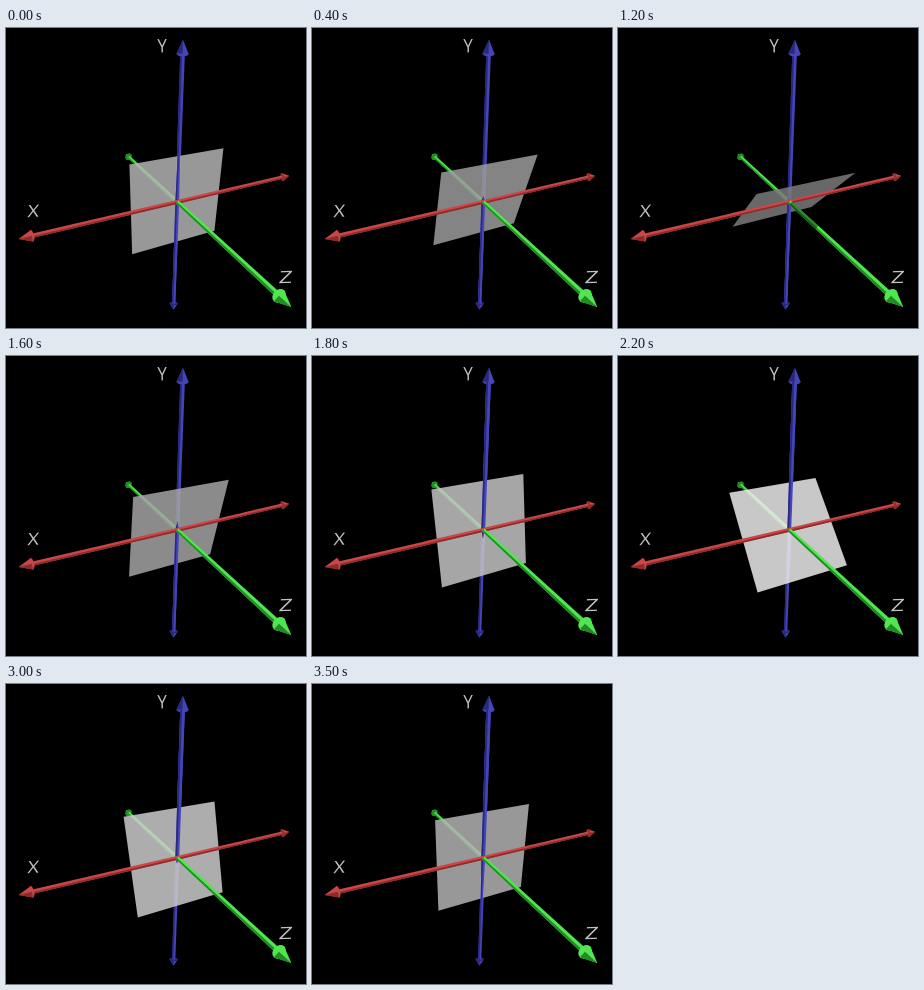
Write an HTML page that moves like this. It is 300 by 300 pixels and loops after 3.6 s.

```html
<!DOCTYPE html>
<html lang="en">
<head>
<meta charset="utf-8">
<title>Plane turning about the X axis</title>
<style>
  html, body { margin: 0; width: 100%; height: 100%; overflow: hidden; background: #000; }
  svg { display: block; width: 100vw; height: 100vh; }
  text { font-family: "Open Sans", "DejaVu Sans", sans-serif; font-size: 17px; fill: #c4c4c4; text-anchor: middle; }
</style>
</head>
<body>
<svg viewBox="0 0 300 300">
  <rect width="300" height="300"/>
  <g id="behind"></g>
  <polygon id="plane" fill-opacity=".84"/>
  <g id="yFront"></g>
  <g id="front"></g>
  <g id="labels">
    <text transform="matrix(1.15 -.06 -.08 1 27 189)">X</text>
    <text transform="matrix(1 -.02 .02 1.1 156.3 24.5)">Y</text>
    <text transform="matrix(1.4 -.04 -.12 1 279 255)">Z</text>
  </g>
</svg>
<script>
const FRAME = 100, FRAMES = 36, SEGMENT = 12;
const ORIGIN = [171.3, 173.8];
const HALF = 1 / 3, RADIUS = 1.9, CONE = 4.9, NECK = 0.93;

// Screen direction, perspective factor, and side of the shaded edge
const axes = {
  x: { dir: [-131.2, 30.7], k: 0.1734, shade: -1, tilt: 0.4, light: '#cb4646', dark: '#8e2c2c' },
  y: { dir: [4.6, -129.6], k: 0.2, shade: -1, tilt: 0.45, light: '#4545b8', dark: '#29297c' },
  z: { dir: [70.9, 65.5], k: 0.378, shade: 1, tilt: 0.78, light: '#4fe64f', dark: '#238a26' }
};
const $ = id => document.getElementById(id);

function project(x, y, z) {
  const { x: a, y: b, z: c } = axes;
  const w = 1 - x * a.k - y * b.k - z * c.k;
  return [0, 1].map(i => ORIGIN[i] + (x * a.dir[i] + y * b.dir[i] + z * c.dir[i]) / w);
}

const onAxis = (axis, t) => axis.dir.map((d, i) => ORIGIN[i] + d * t / (1 - axis.k * t));
const points = list => list.map(p => p.map(v => v.toFixed(2)).join()).join(' ');
const polygon = (list, fill) => `<polygon points="${points(list)}" fill="${fill}"/>`;

// Point beside the axis, at a given radius
function beside(axis, t, radius) {
  const [dx, dy] = axis.dir, len = Math.hypot(dx, dy);
  const r = radius / (1 - axis.k * t), [px, py] = onAxis(axis, t);
  return [px - dy / len * r, py + dx / len * r];
}

function rod(axis, t0, t1, r0 = RADIUS, r1 = r0) {
  const strip = (a, b) => [beside(axis, t0, a * r0), beside(axis, t1, a * r1),
                           beside(axis, t1, b * r1), beside(axis, t0, b * r0)];
  return polygon(strip(-1, 1), axis.light) +
         polygon(strip(axis.shade, axis.shade * 0.15), axis.dark);
}

function cone(axis, end) {
  const neck = end * NECK, tip = onAxis(axis, end), [cx, cy] = onAxis(axis, neck);
  const r = CONE / (1 - axis.k * neck);
  const angle = Math.atan2(axis.dir[1], axis.dir[0]) * 180 / Math.PI;
  const base = `<ellipse rx="${r * axis.tilt}" ry="${r}" fill="${end > 0 ? axis.light : axis.dark}"
    transform="translate(${cx} ${cy}) rotate(${angle})"/>`;
  const body = polygon([tip, beside(axis, neck, CONE), beside(axis, neck, -CONE)], axis.light) +
    polygon([tip, beside(axis, neck, axis.shade * CONE), beside(axis, neck, 0)], axis.dark);
  return end > 0 ? base + body : body + base;
}

const arm = (axis, end) => end > 0
  ? rod(axis, 0, NECK) + cone(axis, 1)
  : cone(axis, -1) + rod(axis, 0, -NECK);

const { x, y, z } = axes;
$('behind').innerHTML = arm(z, -1) + arm(y, -1) + arm(y, 1);
$('front').innerHTML = arm(x, -1) + arm(x, 1) + arm(z, 1) +
  `<g id="shadow">${polygon([beside(z, 0.02, RADIUS), beside(z, 0.34, RADIUS),
    beside(z, 0.34, -RADIUS), beside(z, 0.02, -RADIUS)], '#000')}</g>`;

// Swing 0 -> 45 -> -45 -> 0 degrees, eased within each segment
function swing(frame) {
  const keys = [0, 45, -45, 0];
  const i = Math.min(Math.floor(frame / SEGMENT), 2), u = frame / SEGMENT - i;
  return (keys[i] + (keys[i + 1] - keys[i]) * u * u * (3 - 2 * u)) * Math.PI / 180;
}

function draw(ms) {
  const angle = swing(Math.floor(ms / FRAME) % FRAMES + 1);
  const s = Math.sin(angle), c = Math.cos(angle);
  const corner = (sx, sy) => project(sx * HALF, sy * HALF * c, sy * HALF * s);
  const grey = Math.min(255, Math.round((153 - 70 * s) / 0.84));
  $('plane').setAttribute('points', points([corner(1, 1), corner(-1, 1), corner(-1, -1), corner(1, -1)]));
  $('plane').setAttribute('fill', `rgb(${grey},${grey},${grey})`);

  // One half of the Y rod is before the plane; the other only pokes through near the centre
  const near = s > 0 ? -1 : 1;
  const poke = Math.min(NECK, 0.013 / Math.max(Math.abs(s), 1e-4));
  $('yFront').innerHTML = rod(y, 0, near * NECK) + rod(y, 0, -near * poke, RADIUS, 0);
  $('shadow').setAttribute('opacity', Math.max(0, Math.min(0.4, (s - 0.45) * 2)).toFixed(2));
}

const start = performance.now();
function tick() {
  draw(performance.now() - start);
  requestAnimationFrame(tick);
}
tick();
</script>
</body>
</html>
```
